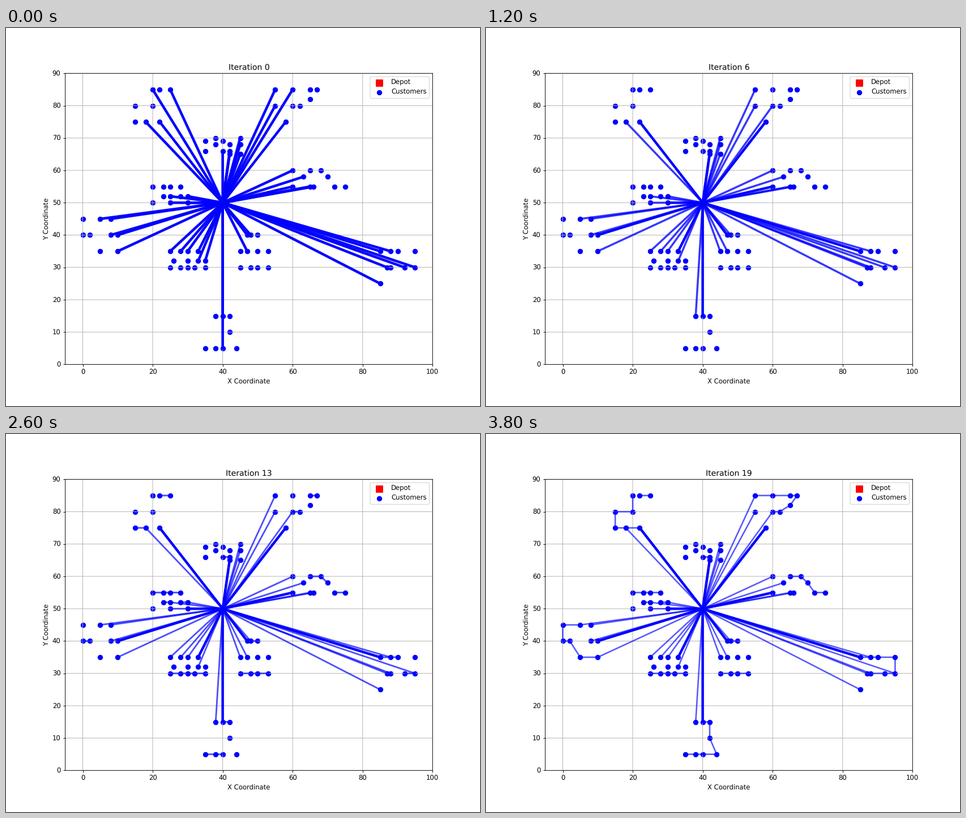
These frames come from a looping animation (837x669 px, 4000 ms). A matplotlib script:

```python
from itertools import combinations
from math import dist, exp

import matplotlib.pyplot as plt
from matplotlib.animation import FuncAnimation

DPI = 83.7
FRAMES = 20
DEPOT = (40, 50)
plt.rcParams.update({"path.snap": False, "text.hinting": "none"})

# Rows of customers, y -> runs of x; each run is a path.
# The first customer of a linked run is also tied to the depot.
LINKED = {
    85: [[55, 60, 65, 67]], 80: [[55], [60, 62]], 75: [[22, 18, 15], [18], [58]],
    70: [[45]], 68: [[45]], 66: [[42, 40]], 65: [[42], [45]],
    60: [[60]], 58: [[63]], 55: [[60], [65], [66]],
    52: [[30, 28], [25, 23]], 50: [[30], [25]], 45: [[5, 0], [8]],
    40: [[10], [8], [47, 48, 50], [48]],
    35: [[10, 5], [25], [28], [30], [33], [45], [47], [85, 88, 90, 95], [88]],
    32: [[33]], 30: [[87, 88, 92, 95], [88], [95]], 25: [[85]],
    15: [[38], [40, 42]],
}
LOOSE = {
    85: [[20], [22, 25]], 82: [[65]], 80: [[15, 20]], 70: [[38]],
    69: [[35], [40]], 68: [[38], [42]], 66: [[35]], 60: [[65, 68]], 58: [[70]],
    55: [[20, 23, 25, 28], [72, 75]], 50: [[20]], 40: [[0, 2]],
    35: [[50], [53]], 32: [[26], [30], [35]],
    30: [[25, 28, 30, 32, 35], [45, 48, 50, 53]], 10: [[42]],
    5: [[35, 38, 40, 44]],
}
# Depot links given up after an iteration, and those found after the first
FADING = {0: [(40, 5), (60, 85), (35, 32)],
          4: [(20, 85), (25, 85), (40, 66)], 10: [(92, 30)]}
FRESH = [(38, 15), (45, 35), (60, 80), (88, 30)]


def runs(rows):
    return [[(x, y) for x in xs] for y, group in rows.items() for xs in group]


def radius(p):
    return dist(p, DEPOT)


def birth(a, b):
    """Short links are discovered before long ones."""
    return min(16, round(3.2 + 2.9 * dist(a, b)))


def joins(linked, loose, reach=6, inner=26):
    """Connect free path ends of the outer clusters, nearest pairs first."""
    free = {run[-1]: 1 for run in linked if len(run) > 1}
    for run in loose:
        free.update({run[0]: 1, run[-1]: 1} if len(run) > 1 else {run[0]: 2})
    ends = [p for p in free if radius(p) > inner]
    pairs = [(a, b) for a, b in combinations(ends, 2)
             if a[1] != b[1] and dist(a, b) < reach]
    for a, b in sorted(pairs, key=lambda pair: dist(*pair)):
        if free[a] and free[b]:
            free[a] -= 1
            free[b] -= 1
            yield a, b


linked, loose = runs(LINKED), runs(LOOSE)
heads = [run[0] for run in linked]


def is_strong(p):
    """The customer closest to the depot in its neighbourhood."""
    return not any(dist(p, q) < 7.5 and radius(q) < radius(p) for q in heads)


# The small surplus keeps the pixel size from rounding down
fig, ax = plt.subplots(figsize=(837.001 / DPI, 669.001 / DPI), dpi=DPI)
ax.scatter([], [], c="red", marker="s", s=100, label="Depot")
customers = {p for run in linked + loose for p in run}
ax.scatter(*zip(*sorted(customers)), c="blue", s=50, label="Customers")
ax.set(xlim=(-5, 100), ylim=(0, 90),
       xlabel="X Coordinate", ylabel="Y Coordinate")
ax.grid(True)
ax.legend(loc="upper right")
title = ax.set_title("Iteration 0")

edges = []


def add_edge(a, b, first=0, last=FRAMES, strong=False):
    line, = ax.plot(*zip(a, b), color="blue")
    edges.append((line, first, last, strong))


for p in heads:
    add_edge(DEPOT, p, first=int(p in FRESH), strong=is_strong(p))
for last, points in FADING.items():
    for p in points:
        add_edge(DEPOT, p, last=last)
for run in linked + loose:
    for a, b in zip(run, run[1:]):
        add_edge(a, b, birth(a, b))
for a, b in joins(linked, loose):
    add_edge(a, b, birth(a, b))


def update(i):
    title.set_text(f"Iteration {i}")
    width = 2 + 2 * exp(-i / 9)
    alpha = 0.62 + 0.35 * exp(-i / 8)
    for line, first, last, strong in edges:
        line.set_visible(first <= i <= last)
        line.set_linewidth(3.9 if strong else width)
        line.set_alpha(0.98 if strong else alpha)
    return [title] + [edge[0] for edge in edges]


anim = FuncAnimation(fig, update, frames=FRAMES, interval=200,
                     repeat=True, repeat_delay=0, blit=False)
plt.show()
```
